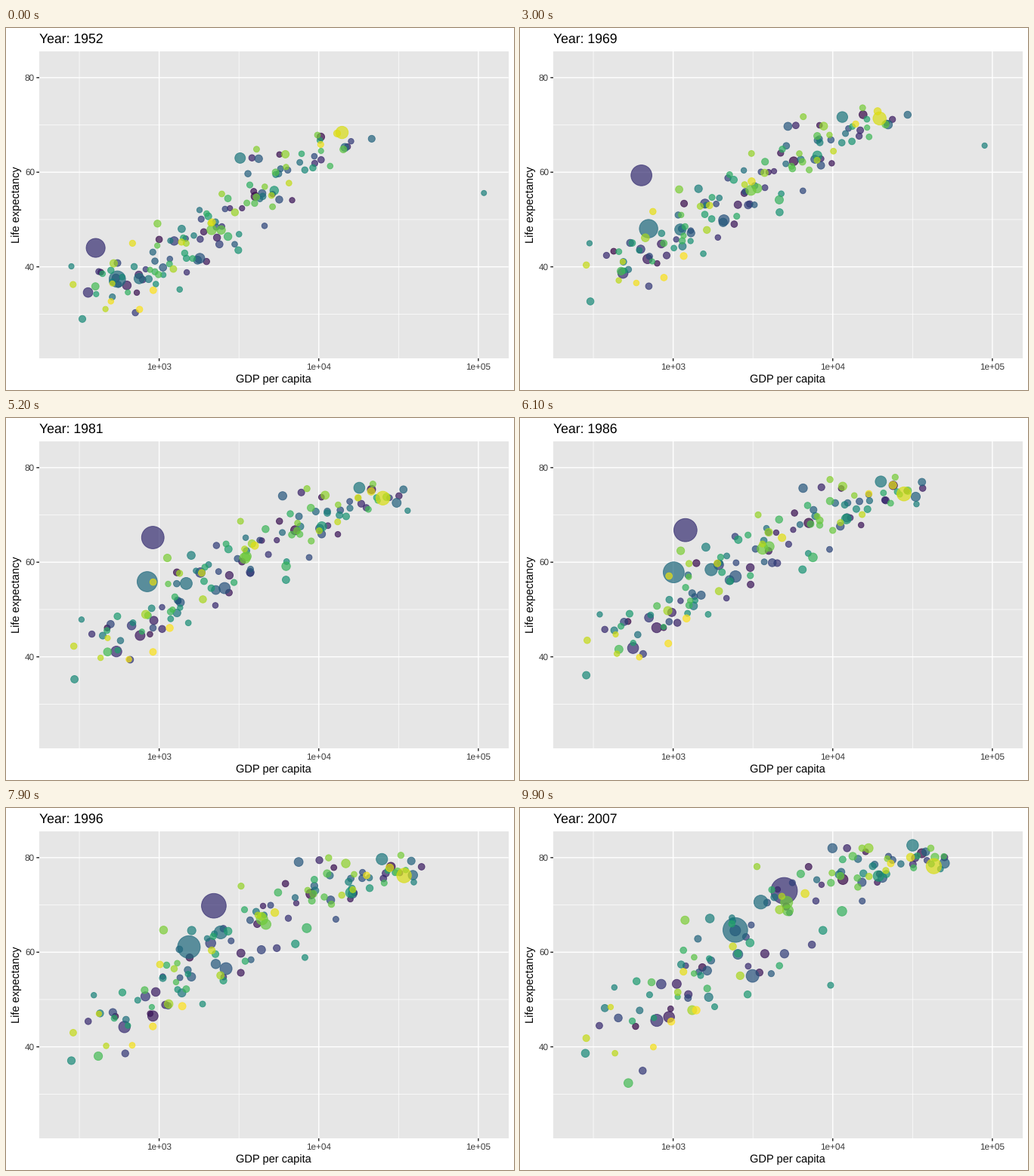
Write a matplotlib script that moves like this. It is 672x480 px and loops after 10000 ms.

```python
import numpy as np
import matplotlib
import matplotlib.pyplot as plt
from matplotlib.animation import FuncAnimation
from matplotlib.patches import Rectangle

W, H, DPI = 672, 480, 96
PT = 72 / DPI
FRAMES, STEP = 100, 9            # nine frames per five-year interval
COUNT = 142
YEARS = np.arange(1952, 2008, 5)
LEFT, RIGHT, TOP, BOTTOM = 44, 664.67, 31, 438
X_MIN, X_MAX = 2.2487, 5.1887    # log10 of income
Y_MIN, Y_MAX = 20.65, 85.55

# Landmark dots by colour rank: population in millions (first, last), then (year, income, life)
LANDMARKS = {
    25: (556, 1319, [(1952, 400, 44), (1957, 576, 50.5), (1962, 488, 44.5), (1967, 613, 58.4),
                     (1977, 741, 64), (1992, 1656, 68.7), (2007, 4959, 73)]),
    59: (372, 1110, [(1952, 547, 37.4), (1982, 856, 56.6), (2007, 2452, 64.7)]),
    60: (82, 223, [(1952, 750, 37.5), (1982, 1517, 56.2), (2007, 3541, 70.6)]),
    67: (86, 127, [(1952, 3217, 63), (1972, 14800, 73.4), (2007, 31656, 82.6)]),
    72: (.2, 2.5, [(1952, 108400, 55.6), (1967, 80900, 64.6), (1972, 109300, 67.7),
                   (1982, 31400, 71.3), (2007, 47300, 77.6)]),
    135: (157, 301, [(1952, 13990, 68.4), (2007, 42950, 78.2)]),
}


def tone(rgb):
    """Re-encode sRGB for a display gamma of 1.8."""
    c = np.asarray(rgb, float)
    linear = np.where(c <= .04045, c / 12.92, ((c + .055) / 1.055) ** 2.4)
    return linear ** (1 / 1.8)


def grey(level):
    return tuple(tone([level] * 3))


def px(log_income):
    return LEFT + (RIGHT - LEFT) * (log_income - X_MIN) / (X_MAX - X_MIN)


def py(life):
    return BOTTOM - (BOTTOM - TOP) * (life - Y_MIN) / (Y_MAX - Y_MIN)


def crowd(n, rng):
    """Log income, life expectancy and population, each of shape (years, n)."""
    wealth = rng.permutation((np.arange(n) + .5) / n)
    t = np.linspace(0, 1, len(YEARS))[:, None]
    ease = t ** .85

    income = 2.55 + 1.55 * wealth + (.05 + .5 * wealth) * ease
    income = income + .08 * np.clip(rng.standard_t(4, n), -4, 4) + .12 * rng.normal(size=n) * t
    income = income + rng.normal(0, .02, (len(YEARS), n))

    early = 36 + 32 * wealth ** 1.5
    late = 45 + 35 * (1 - (1 - wealth) ** 1.8)
    spread = 1 + 4.5 * (1 - wealth) ** .7 * (.6 + .4 * wealth)
    life = early + (late - early) * ease + spread * np.clip(rng.normal(size=n), -2, 2)
    decline = rng.exponential(5, n) * (wealth < .55)
    life = life - decline * np.clip(t - .65, 0, 1) / .35
    life = life + rng.normal(0, .3, (len(YEARS), n))

    people = np.clip(5 * np.exp(1.2 * rng.normal(size=n)), .1, 70)
    return np.clip(income, 2.45, 4.7), np.clip(life, 28, 82), people * np.exp(.9 * t)


def build():
    log_income, life, pop = np.empty((3, len(YEARS), COUNT))
    rest = [i for i in range(COUNT) if i + 1 not in LANDMARKS]
    log_income[:, rest], life[:, rest], pop[:, rest] = crowd(len(rest), np.random.default_rng(52))
    for rank, (first, last, path) in LANDMARKS.items():
        when, money, age = zip(*path)
        log_income[:, rank - 1] = np.interp(YEARS, when, np.log10(money))
        life[:, rank - 1] = np.interp(YEARS, when, age)
        pop[:, rank - 1] = np.geomspace(first, last, len(YEARS))
    return log_income, life, pop


def at(keys, i):
    k = min(i // STEP, len(YEARS) - 2)
    t = i / STEP - k
    return keys[k] * (1 - t) + keys[k + 1] * t


plt.rcParams["font.family"] = "Liberation Sans"
plt.rcParams["text.hinting"] = "none"
fig = plt.figure(figsize=(W / DPI, H / DPI), dpi=DPI, facecolor="white")
ax = fig.add_axes([0, 0, 1, 1])
ax.set_xlim(0, W)
ax.set_ylim(H, 0)
ax.axis("off")


def line(xs, ys, width, color="white"):
    ax.plot(xs, ys, color=color, lw=width * PT, solid_capstyle="butt", snap=False, zorder=1)


def label(x, y, text, size, color="black", **kw):
    return ax.text(x, y, text, fontsize=size, color=color, rotation_mode="anchor", **kw)


panel = Rectangle((LEFT, TOP), RIGHT - LEFT, BOTTOM - TOP, fc=grey(.922), lw=0, zorder=0)
ax.add_patch(panel)
for v in (2.5, 3.5, 4.5):
    line([px(v)] * 2, [TOP, BOTTOM], .71)
for v in (30, 50, 70):
    line([LEFT, RIGHT], [py(v)] * 2, .71)
for v in (3, 4, 5):
    line([px(v)] * 2, [TOP, BOTTOM], 1.42)
    line([px(v)] * 2, [BOTTOM, BOTTOM + 3.67], 1.42, grey(.2))
    label(px(v), 453, f"1e+0{v}", 8.8, grey(.302), ha="center")
for v in (40, 60, 80):
    line([LEFT, RIGHT], [py(v)] * 2, 1.42)
    line([LEFT - 3.67, LEFT], [py(v)] * 2, 1.42, grey(.2))
    label(38, py(v) + 4, str(v), 8.8, grey(.302), ha="right")

label((LEFT + RIGHT) / 2, 470, "GDP per capita", 11, ha="center")
label(18, (TOP + BOTTOM) / 2, "Life expectancy", 11, rotation=90, ha="center")
title = label(LEFT, 20, "", 13.2)

log_income, life, pop = build()
diameter = (2 + 10 * np.sqrt(pop / pop.max())) * 2.845 + .945
colors = np.full((COUNT, 4), .7)
colors[:, :3] = tone(matplotlib.colormaps["viridis"](np.linspace(0, 1, COUNT))[:, :3])
cloud = ax.scatter(np.zeros(COUNT), np.zeros(COUNT), s=1, c=colors,
                   edgecolors=colors, linewidths=.945 * PT, zorder=2)
cloud.set_clip_path(panel)


def draw(i):
    cloud.set_offsets(np.column_stack([px(at(log_income, i)), py(at(life, i))]))
    cloud.set_sizes((at(diameter, i) * PT) ** 2)
    title.set_text(f"Year: {round(1952 + 55 * i / (FRAMES - 1))}")
    return cloud, title


anim = FuncAnimation(fig, draw, frames=FRAMES, interval=100, repeat=True, repeat_delay=0)
plt.show()
```
